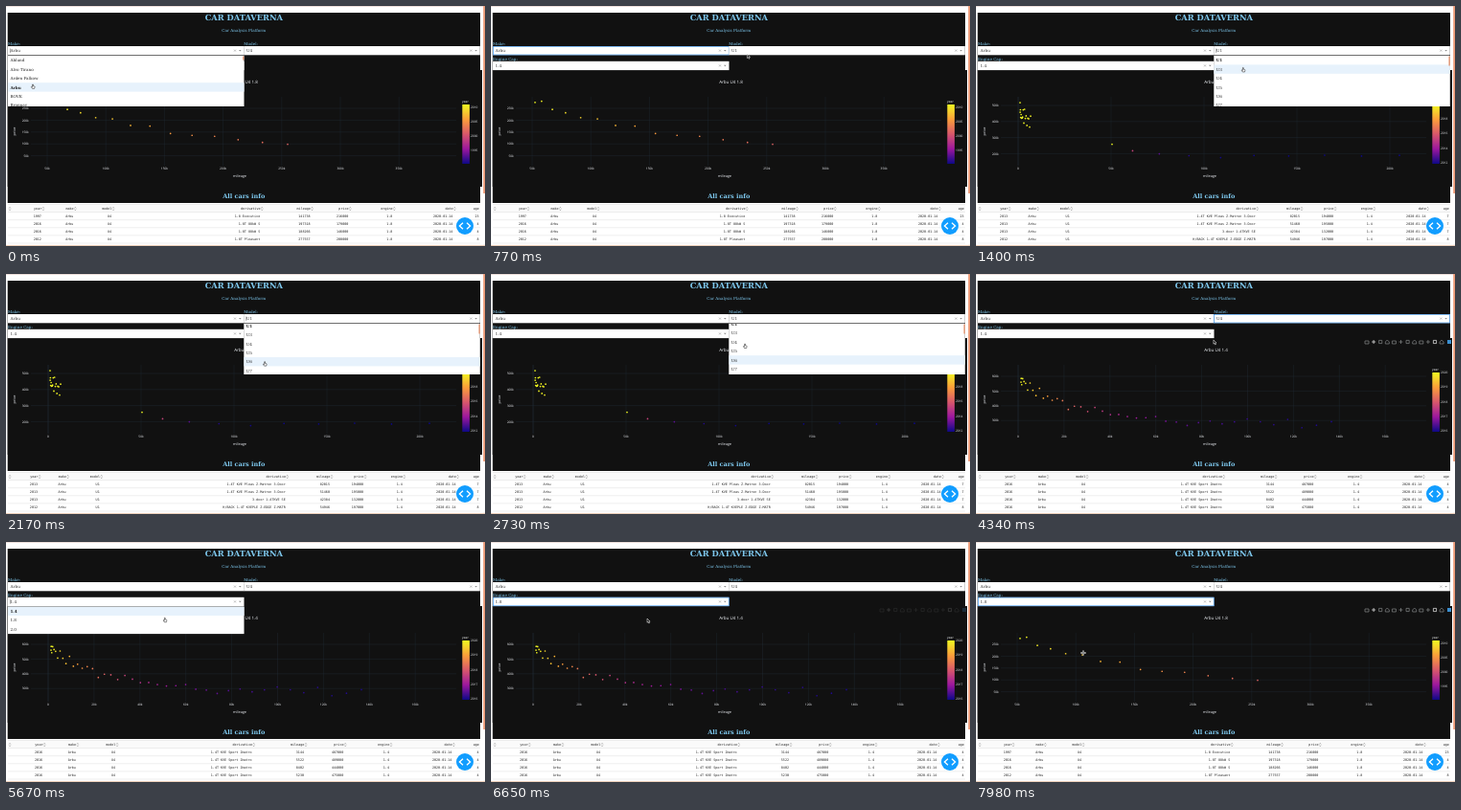
Animation of 500x251 px, one loop 8000 ms. Source, as an HTML page:

```html
<!DOCTYPE html>
<html lang="en">
<head>
<meta charset="utf-8">
<title>Car dashboard</title>
<style>
html, body { margin: 0; width: 100%; height: 100%; overflow: hidden; background: #fff; }
svg { display: block; width: 500px; height: 251px; text-rendering: geometricPrecision; }
text { white-space: pre; }
.serif { font-family: "DejaVu Serif", serif; }
.sans { font-family: "Open Sans", sans-serif; fill: #f2f5fa; }
.mono { font-family: "DejaVu Sans Mono", monospace; fill: #222; }
.head { fill: #7ec8ee; }
.bold { font-weight: 700; }
</style>
</head>
<body>
<svg id="stage" viewBox="0 0 500 251"></svg>
<script>
const LOOP = 8000;
const NS = "http://www.w3.org/2000/svg";
const PLASMA = ["#f0f921", "#fb9f3a", "#d8576b", "#9c179e", "#0d0887"];
const MAKE = "Arbu";
const stage = document.getElementById("stage");
const timed = [];

function add(parent, tag, attrs = {}) {
  const el = document.createElementNS(NS, tag);
  for (const k in attrs) el.setAttribute(k, attrs[k]);
  parent.append(el);
  return el;
}
const group = (parent, attrs) => add(parent, "g", attrs);
const rect = (p, x, y, width, height, fill, more) =>
  add(p, "rect", { x, y, width, height, fill, ...more });
const path = (p, d, stroke, width, more) =>
  add(p, "path", { d, fill: "none", stroke, "stroke-width": width, ...more });

// y is the middle of the capitals
function label(p, x, y, str, size, cls, more) {
  const el = add(p, "text", { x, y: y + size * 0.36, "font-size": size, class: cls, ...more });
  el.textContent = str;
}
const mid = { "text-anchor": "middle" };
const end = { "text-anchor": "end" };

// Show an element only inside the given [from, to) spans
function during(el, ...spans) {
  timed.push({ el, spans });
  return el;
}

function seeded(seed) {
  return () => (seed = (seed * 16807) % 2147483647) / 2147483647;
}

// Page
rect(stage, 0, 0, 500, 0.6, "#e6cfc8");
rect(stage, 1.7, 7, 493.3, 199, "#111");
rect(stage, 1.7, 67, 495.3, 122, "#111");
rect(stage, 498.2, 0, 1.8, 196, "#ee9b78");
rect(stage, 0, 249.8, 500, 1.2, "#efd2bd");
label(stage, 248.3, 12.4, "CAR DATAVERNA", 8.3, "serif head bold", mid);
label(stage, 248.3, 25.7, "Car Analysis Platform", 4.17, "serif head", mid);
label(stage, 248.3, 198.3, "All cars info", 6.5, "serif head bold", mid);

// Charts: price decays with mileage, colour ages with it
function plasma(k) {
  const s = Math.min(k, 0.999) * (PLASMA.length - 1), i = Math.floor(s);
  return `color-mix(in srgb, ${PLASMA[i + 1]} ${(s - i) * 100}%, ${PLASMA[i]})`;
}

function scatter(g, { n, from, to, skew, top, drop, fall, noise, fade }) {
  const rnd = seeded(n * 7919);
  for (let i = 0; i < n; i++) {
    const x = from + (to - from) * (i / (n - 1)) ** skew;
    const y = top + drop * (1 - Math.exp((from - x) / fall)) + (rnd() - 0.5) * noise;
    const dot = add(g, "circle", { cx: x, cy: y, r: 0.85 });
    dot.style.fill = plasma(1 - Math.exp((from - x) / fade));
  }
}

// Axes are { from, by: value step, at, gap: pixel step, n }
function ticks({ from, by, at, gap, n }, unit, draw) {
  for (let i = 0; i < n; i++) {
    const v = from + i * by;
    draw(at + i * gap, v ? v + unit : "0");
  }
}

function chart(spans, title, xs, ys, years, ...clouds) {
  const g = during(group(stage), ...spans);
  ticks(xs, "k", (x, v) => {
    path(g, `M${x} 95V167`, "#283442", v === "0" ? 0.6 : 0.3);
    label(g, x, 169.8, v, 3.2, "sans", mid);
  });
  ticks(ys, "k", (y, v) => {
    path(g, `M26 ${y}H470`, "#283442", 0.3);
    label(g, 23.8, y, v, 3.2, "sans", end);
  });
  ticks(years, "", (y, v) => label(g, 485, y, v, 3.2, "sans"));
  clouds.forEach(c => scatter(g, c));
  label(g, 250.5, 79.8, `${MAKE} ${title}`, 4.5, "sans", mid);
}

const OLD = [[0, 910], [7000, LOOP]];
const SMALL = [[910, 3150]];
const NEW = [[3150, 7000]];

chart(OLD, "U4 1.8",
  { from: 50, by: 50, at: 43, gap: 61.2, n: 7 },
  { from: 250, by: -50, at: 107, gap: 12.4, n: 5 },
  { from: 2010, by: -5, at: 106, gap: 15, n: 4 },
  { n: 14, from: 46, to: 294, skew: 1.4, top: 99, drop: 50, fall: 120, noise: 5, fade: 400 });
chart(SMALL, "U1 1.4",
  { from: 0, by: 50, at: 44, gap: 97, n: 5 },
  { from: 500, by: -100, at: 104, gap: 16.8, n: 4 },
  { from: 2018, by: -2, at: 118, gap: 15.3, n: 4 },
  { n: 18, from: 46, to: 57, skew: 1.6, top: 108, drop: 14, fall: 8, noise: 18, fade: 400 },
  { n: 10, from: 142, to: 442, skew: 1.2, top: 144, drop: 13, fall: 25, noise: 5, fade: 25 });
chart(NEW, "U4 1.4",
  { from: 0, by: 20, at: 44, gap: 47.9, n: 9 },
  { from: 600, by: -100, at: 107, gap: 15.4, n: 4 },
  { from: 2020, by: -1, at: 103, gap: 15.3, n: 5 },
  { n: 42, from: 47, to: 371, skew: 2, top: 112, drop: 45, fall: 60, noise: 10, fade: 90 });

label(stage, 244, 177.3, "mileage", 3.8, "sans", mid);
label(stage, 0, 0, "price", 3.8, "sans", { ...mid, transform: "translate(8.6 131) rotate(-90)" });
label(stage, 476, 99.6, "year", 3.4, "sans");
const fade = add(stage, "linearGradient", { id: "plasma", x1: 0, y1: 0, x2: 0, y2: 1 });
PLASMA.forEach((c, i) => add(fade, "stop", { offset: i / (PLASMA.length - 1), "stop-color": c }));
rect(stage, 476.3, 103, 7.6, 62, "url(#plasma)");

// Chart toolbar
const bar = group(stage);
const ICONS = ["M-2-1h4v3h-4z", "M0-2V2M-2 0H2", "M-1.6-1.6h3.2v3.2h-3.2z", "M-2 0L0-2L2 0V2H-2z"];
for (let i = 0; i < 12; i++)
  path(bar, ICONS[i % ICONS.length], i % 9 === 1 ? "#f4f4f4" : "#858789", 0.7,
    { transform: `translate(${408 + i * 7.1} 71)` });
rect(bar, 492, 69, 4, 4, "#3a8fd0");

// Table
rect(stage, 0, 206, 498, 43.8, "#fff");
rect(stage, 2, 207.5, 493, 8.5, "#fafafa");
for (let y = 207.5; y < 250; y += 8.1) path(stage, `M2 ${y}H495`, "#d3d3d3", 0.4);
const COLS = ["year", "make", "model", "derivative", "mileage", "price", "engine", "date", "age"];

const sortIcon = (p, x) =>
  path(p, `M${x} 211.5l.8-1.1l.8 1.1M${x} 212.6l.8 1.1l.8-1.1`, "#666", 0.45);

// Column widths share the row in proportion to their longest text
function columns(kindLength) {
  const sizes = COLS.map(c => c === "derivative" ? kindLength : c === "date" ? 10 : c.length + 1.3);
  const unit = 490 / sizes.reduce((a, b) => a + b);
  let x = 3.5;
  return sizes.map(s => x += s * unit);
}

function table(spans, { model, engine, kindLength, maxKm, maxPrice, rows }) {
  const g = during(group(stage), ...spans);
  const rnd = seeded(maxKm);
  const rights = columns(kindLength);
  COLS.forEach((name, i) => {
    label(g, rights[i] + 0.3, 212, name, 3.4, "mono", end);
    if (name !== "age") sortIcon(g, rights[i] + 1.2);
  });
  rows.forEach(([year, kind], r) => {
    const km = Math.round(maxKm * (0.3 + 0.7 * rnd()));
    const price = Math.round(maxPrice * (0.6 + 0.4 * rnd()) / 1000) * 1000;
    const cells = [year, MAKE, model, kind, km, price, engine, "2020-01-14", 2020 - year];
    cells.forEach((c, i) => label(g, rights[i], 220 + r * 8.05, c, 3.4, "mono", end));
  });
}
sortIcon(stage, 3.2);

table(OLD, {
  model: "U4", engine: "1.8", kindLength: 24.6, maxKm: 290000, maxPrice: 220000,
  rows: [[1997, "1.8 Executive"], [2016, "1.8T 88kW S"], [2016, "1.8T 88kW S"], [2012, "1.8T Pleasant"]]
});
const HATCH = "1.4T KVE Pleas Z-Matron 3-Door";
table(SMALL, {
  model: "U1", engine: "1.4", kindLength: 34.8, maxKm: 98000, maxPrice: 220000,
  rows: [[2013, HATCH], [2013, HATCH], [2013, "3-door 1.4TKVE SE"], [2012, "H/BACK 1.4T KVEPLE Z-EDGE Z-MATR"]]
});
table(NEW, {
  model: "U4", engine: "1.4", kindLength: 21.8, maxKm: 9000, maxPrice: 520000,
  rows: Array(4).fill([2016, "1.4T KVE Sport Zmatro"])
});

// Developer button
add(stage, "circle", { cx: 479, cy: 230, r: 9, fill: "#119dff" });
path(stage, "M477 226.7L473.4 230L477 233.3M481 226.7L484.6 230L481 233.3", "#fff", 1.3);

// Select boxes: values with their spans, open span, focus span, caret end
function select(x, y, title, values, open, focus, caretEnd) {
  label(stage, x, y - 2.6, title, 4.17, "serif head");
  rect(stage, x, y, 246.5, 9.3, "#fff");
  during(rect(stage, x + 0.3, y + 0.3, 245.9, 8.7, "none", { stroke: "#2d8ff0", "stroke-width": 0.6 }), focus);
  for (const [text, ...spans] of values)
    during(group(stage), ...spans).append(stage.ownerDocument.createComment(""));
  for (const [text, ...spans] of values)
    label(during(group(stage), ...spans), x + 2.6, y + 4.6, text, 4.17, "serif", { fill: "#333" });
  during(path(stage, `M${x + 2.4} ${y + 2.5}v4.4`, "#222", 0.4), [open[0], caretEnd]);
  path(stage, `M${x + 236} ${y + 3.6}l2 2m0-2l-2 2`, "#888", 0.5);
  add(stage, "path", { d: `M${x + 241} ${y + 4}h2.6l-1.3 1.5z`, fill: "#888" });
}

select(2, 42, "Make:", [[MAKE, [0, LOOP]]], [0, 350], [350, 1260], 350);
select(248.3, 42, "Model:", [["U4", [0, 700], [2870, LOOP]], ["U1", [700, 2870]]],
  [1260, 2870], [2870, 4620], 2450);
select(2, 57.8, "Engine Cap:", [["1.8", [0, 770], [6650, LOOP]], ["1.4", [770, 6650]]],
  [4620, 6650], [6650, LOOP], 6090);

// Option lists; hovers are [row, from], each lasting until the next
const ROW = 9.4;
const clip = add(stage, "clipPath", { id: "listClip" });
rect(clip, 0, 0, 247, 53, "#000");

function menu(x, y, height, items, chosen, span, hovers, thumb) {
  const g = during(group(stage, { transform: `translate(${x} ${y})` }), span);
  rect(g, 0, 0, 246.5, height, "#fff");
  path(g, "M0 0H246.5", "#ccc", 0.4);
  const list = group(group(g, { "clip-path": "url(#listClip)" }));
  hovers.forEach(([row, from], i) => {
    const to = i + 1 < hovers.length ? hovers[i + 1][1] : span[1];
    during(rect(list, 0, row * ROW, 246.5, ROW, "#e7f2fc"), [from, to]);
  });
  items.forEach((s, i) =>
    label(list, 2.4, (i + 0.5) * ROW + 0.2, s, 4.17, i === chosen ? "serif bold" : "serif", { fill: "#222" }));
  rect(g, 245.2, 0.5, 1.2, thumb, "#e58a63");
  return list;
}

menu(2, 52, 53, ["Ablund", "Alvo Tirano", "Arden Falkow", MAKE, "BOVK", "Bronnay"], 3, [0, 350], [[3, 0]], 4);
const models = menu(248.3, 52, 53, ["U1", "U3", "U4", "U5", "U6", "U7"], 0, [1260, 2870],
  [[0, 1260], [1, 1330], [2, 1750], [3, 1890], [4, 2100], [2, 2800]], 10);
menu(2, 67.6, 28.5, ["1.4", "1.8", "2.0"], 0, [4620, 6650], [[0, 4620], [1, 5740]], 0);

// Pointer shapes, with the hot spot at 0,0
const pointer = group(stage);
const hand = add(pointer, "path", {
  d: "M-.4 0Q0-.5.4 0V1.6L1.8 2Q2.2 2.2 2 3L1.6 4.4H-.5L-1.6 2.7Q-1.6 2.1-1 2.4L-.4 2.8Z",
  fill: "#fff", stroke: "#111", "stroke-width": 0.5
});
const arrow = add(pointer, "path", {
  d: "M0 0V4.3L1 3.4L1.8 5L2.5 4.7L1.8 3.1H3.1Z",
  fill: "#111", stroke: "#fff", "stroke-width": 0.5
});
const cross = group(pointer);
path(cross, "M0-2.6V2.6M-2.6 0H2.6", "#fff", 1.3);
path(cross, "M0-2.3V2.3M-2.3 0H2.3", "#111", 0.5);
during(hand, [0, 490], [1260, 2870], [5460, 6650]);
during(arrow, [490, 1260], [2870, 5460], [6650, 7600]);
during(cross, [7600, LOOP]);

// Each move runs from start to stop and ends at x, y
const HOME = [28, 82];
const MOVES = [
  [350, 1120, 292, 47], [1260, 1540, 277, 67], [1680, 2310, 270, 92],
  [2450, 2800, 265, 73], [3430, 4200, 248, 69], [4340, 4620, 240, 63],
  [5390, 5810, 163, 80], [7490, 7700, 124, 110], [7770, 7980, 112, 116]
];
const ramp = (t, a, b) => Math.max(0, Math.min(1, (t - a) / (b - a)));
const easeOut = u => 1 - (1 - u) ** 3;

function position(t) {
  let [x, y] = HOME;
  for (const [start, stop, toX, toY] of MOVES) {
    const k = easeOut(ramp(t, start, stop));
    x += (toX - x) * k;
    y += (toY - y) * k;
  }
  return [x, y];
}

function draw(now) {
  const t = now % LOOP;
  for (const { el, spans } of timed)
    el.style.display = spans.some(([a, b]) => t >= a && t < b) ? "" : "none";
  pointer.setAttribute("transform", `translate(${position(t)})`);
  models.setAttribute("transform", `translate(0 ${-4.4 * ramp(t, 2130, 2200)})`);
  bar.style.opacity = ramp(t, 2870, 3170) - ramp(t, 4400, 4700) + ramp(t, 6590, 6890);
}

const start = performance.now();
function tick() {
  draw(performance.now() - start);
  requestAnimationFrame(tick);
}
tick();
</script>
</body>
</html>
```
